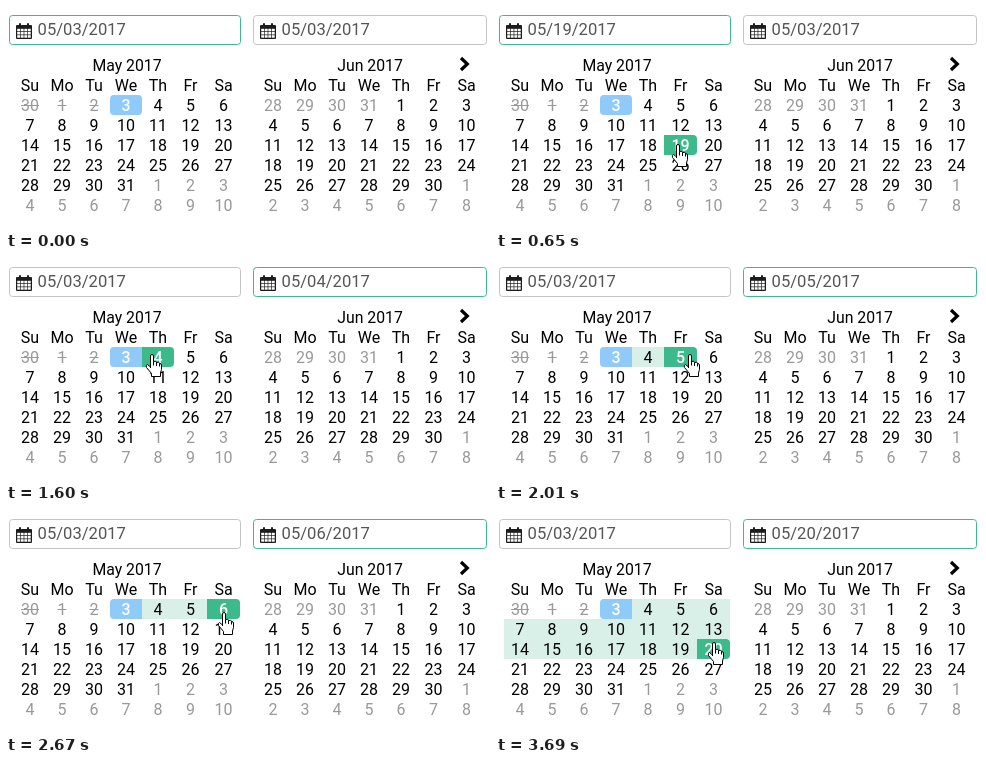
Animation of 484 by 224 pixels, one loop 4.32 s. Source, as an HTML page with a canvas:

```html
<!DOCTYPE html>
<html lang="en">
<head>
<meta charset="utf-8">
<title>Date range picker</title>
<style>
html, body { margin: 0; width: 484px; height: 224px; overflow: hidden; background: #fff; }
canvas { display: block; }
</style>
</head>
<body>
<canvas id="stage" width="484" height="224"></canvas>
<script>
const ctx = document.getElementById('stage').getContext('2d');
const LOOP = 4320, PICKED_AT = 1270;
const GREEN = '#3dba8c', BLUE = '#90caf9', PALE = '#d8f0e7', GREY = '#999', BLACK = '#000';
const ROW = 20, TOP = 89;
const START = new Date(2017, 4, 3);

// Bursts of pointer movement: start, end, number of steps
const bursts = [[410, 910, 12], [940, 1040, 2], [1420, 1930, 11],
  [1980, 2420, 11], [2670, 2850, 5], [3330, 3690, 8]];
// Pointer position: time, x, y
const path = [[410, 332, 205], [637, 175, 138], [910, 116, 97], [940, 116, 97], [1040, 116, 96],
  [1420, 120, 96], [1930, 184, 96], [1980, 187, 96], [2420, 211, 98], [2670, 211, 102],
  [2850, 211, 108], [3330, 211, 109], [3690, 211, 132]];

const hand = new Path2D('M5.5 14V2Q5.5 .5 7 .5T8.5 2V7.5Q11.5 6.5 11.5 8.5Q14.5 7.5 14.5 9.5' +
  'Q16.5 9.5 16.5 11V15.5L15.5 19V22.5H6.5V19.5L1.5 13.5Q.5 11 2.5 10.5L5.5 13Z');
const knuckles = new Path2D('M8.5 7.5v4M11.5 8.5v3.5M14.5 9.5v3');
const chevron = new Path2D('M455 52l6.3 6l-6.3 6');

// Columns are 32 wide; the last two take the two spare pixels
const edge = col => 32 * col + Math.max(0, col - 5);
const middle = col => (edge(col) + edge(col + 1)) / 2;

const calendars = [[4, 8, 'May 2017'], [5, 251, 'Jun 2017']].map(([month, x, title]) => {
  const offset = new Date(2017, month, 1).getDay();
  const days = Array.from({ length: 42 }, (_, i) => {
    const date = new Date(2017, month, 1 - offset + i);
    const col = i % 7;
    return { date, left: x + edge(col), width: edge(col + 1) - edge(col),
      mid: x + middle(col), top: TOP + Math.floor(i / 7) * ROW,
      inMonth: date.getMonth() === month, disabled: date < START };
  });
  return { x, title, days };
});
const allDays = calendars.flatMap(c => c.days);

function pointerAt(time) {
  if (time < path[0][0]) return null;
  let t = path[0][0];
  for (const [from, to, steps] of bursts) {
    if (time < from) break;
    const gap = (to - from) / (steps - 1);
    t = Math.min(to, from + Math.floor((time - from) / gap + 1e-6) * gap);
  }
  let i = 0;
  while (i < path.length - 2 && path[i + 1][0] <= t) i++;
  const [t0, x0, y0] = path[i], [t1, x1, y1] = path[i + 1];
  const k = (t - t0) / (t1 - t0);
  return { x: Math.round(x0 + (x1 - x0) * k), y: Math.round(y0 + (y1 - y0) * k) };
}

function hoveredDay(p) {
  if (!p) return null;
  const x = p.x + 6, y = p.y + 1;
  return allDays.find(d => d.inMonth && !d.disabled &&
    x >= d.left && x < d.left + d.width && y >= d.top && y < d.top + ROW);
}

function text(str, x, y, color = BLACK, font = '16px', align = 'center') {
  ctx.font = font + ' Roboto, sans-serif';
  ctx.textAlign = align;
  ctx.fillStyle = color;
  ctx.fillText(str, x, y);
}

function box(x, y, w, h, color, radii = 0) {
  ctx.fillStyle = color;
  ctx.beginPath();
  ctx.roundRect(x, y, w, h, radii);
  ctx.fill();
}

function drawInput(x, w, date, active) {
  ctx.strokeStyle = active ? GREEN : '#c4c4c4';
  ctx.lineWidth = 1;
  ctx.beginPath();
  ctx.roundRect(x + .5, 9.5, w - 1, 29, 3);
  ctx.stroke();

  // Calendar icon
  box(x + 7, 19, 16, 14, '#1c1c1c', 1);
  for (const dx of [10, 18]) box(x + dx, 17, 2, 4, '#1c1c1c', 1);
  for (let i = 0; i < 12; i++) box(x + 8.2 + i % 4 * 3.55, 22.8 + Math.floor(i / 4) * 3.2, 2.9, 2.5, '#fff');

  const two = n => String(n).padStart(2, '0');
  text(`${two(date.getMonth() + 1)}/${two(date.getDate())}/2017`, x + 28.6, 29, '#555', '16.6px', 'left');
}

function drawDay(day, hover, ranging) {
  const { date, left, width, mid, top } = day;
  const first = day.inMonth && +date === +START;
  const fill = (color, radii) => box(left, top, width, ROW, color, radii);
  const end = day === hover;
  if (first) fill(BLUE, ranging && hover && hover !== day ? [4, 0, 0, 4] : 4);
  else if (end) fill(GREEN, [0, 4, 4, 0]);
  else if (ranging && hover && day.inMonth && date > START && date < hover.date) fill(PALE);

  const marked = first || end;
  const color = marked ? '#fff' : day.inMonth && !day.disabled ? BLACK : GREY;
  text(date.getDate(), mid, top + 16, color, marked ? '500 16px' : '16px');
  if (day.disabled) {
    const w = ctx.measureText(date.getDate()).width;
    box(mid - w / 2, top + 10, w, 1, GREY);
  }
}

function drawPointer({ x, y }) {
  ctx.save();
  ctx.translate(x, y);
  ctx.lineWidth = 1;
  ctx.strokeStyle = '#000';
  ctx.fillStyle = '#fff';
  ctx.fill(hand);
  ctx.stroke(hand);
  ctx.stroke(knuckles);
  ctx.restore();
}

function draw(time) {
  const pointer = pointerAt(time);
  const hover = hoveredDay(pointer);
  const ranging = time >= PICKED_AT;
  const date = hover ? hover.date : START;

  ctx.fillStyle = '#fff';
  ctx.fillRect(0, 0, 484, 224);
  drawInput(3, 232, ranging ? START : date, !ranging);
  drawInput(247, 234, ranging ? date : START, ranging);

  for (const { x, title, days } of calendars) {
    text(title, x + edge(7) / 2, 65, BLACK, '15.8px');
    ['Su', 'Mo', 'Tu', 'We', 'Th', 'Fr', 'Sa'].forEach((name, i) => text(name, x + middle(i), 85));
    days.forEach(day => drawDay(day, hover, ranging));
  }

  ctx.strokeStyle = '#000';
  ctx.lineWidth = 3.2;
  ctx.stroke(chevron);
  if (pointer) drawPointer(pointer);
}

const began = performance.now();
function tick() {
  draw((performance.now() - began) % LOOP);
  requestAnimationFrame(tick);
}
tick();
</script>
</body>
</html>
```
